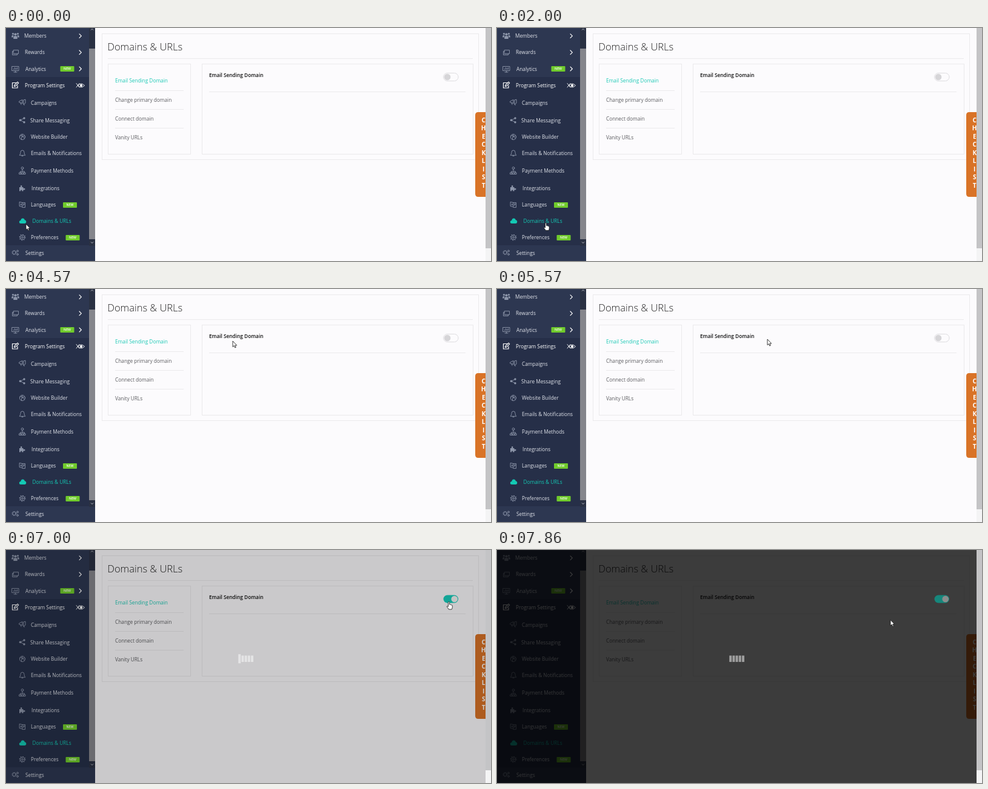
An HTML page for the animation above (8000 ms loop, 800 by 385 pixels).

```html
<!DOCTYPE html>
<html lang="en">
<head>
<meta charset="utf-8">
<title>Domains &amp; URLs</title>
<style>
html, body { margin: 0; width: 100%; height: 100%; overflow: hidden; background: #fcfbfd; }
svg { display: block; width: 800px; height: 385px; font: 8.27px "Open Sans", sans-serif; }
.box { fill: none; stroke: #ebeaec; }
.icon { fill: none; stroke: #8d96aa; stroke-width: .9; stroke-linejoin: round; stroke-linecap: round; }
.solid { fill: #8d96aa; stroke: none; }
.badge { font-size: 5.2px; font-weight: 600; fill: #fff; text-anchor: middle; }
.cursor { fill: #fff; stroke: #111; stroke-width: .8; stroke-linejoin: round; }
</style>
</head>
<body>
<svg viewBox="0 0 800 385">
  <rect width="800" height="385" fill="#fcfbfd"/>

  <g class="box">
    <rect x="158.5" y="9.5" width="621" height="208"/>
    <rect x="168.5" y="59.5" width="136" height="149"/>
    <rect x="323.5" y="59.5" width="447" height="149"/>
    <path d="M168 50.5H770M180 103.5H293M180 134.5H293M180 165.5H293M335 105.5H758"/>
  </g>
  <text x="167.3" y="36.5" font-size="16.5" font-weight="300" fill="#222">Domains &amp; URLs</text>
  <g fill="#5c5c60">
    <text x="180" y="90.3" fill="#1cc9b5">Email Sending Domain</text>
    <text x="180" y="121.5">Change primary domain</text>
    <text x="180" y="153">Connect domain</text>
    <text x="180" y="184.3">Vanity URLs</text>
  </g>
  <text x="335" y="81" font-weight="600" fill="#111">Email Sending Domain</text>

  <rect width="147" height="385" fill="#2d3751"/>
  <rect y="81" width="137" height="278" fill="#262f48"/>
  <rect x="137" width="10" height="360" fill="#2a3143"/>
  <rect x="137" y="34" width="10" height="315" fill="#85868c"/>
  <path d="M140 3.5l2-2 2 2M140 353.500l2 2 2-2" fill="none" stroke="#b9bcc4"/>

  <g id="menu" fill="#dfe2e9"></g>

  <g class="icon">
    <g class="solid">
      <circle cx="15.500" cy="10.500" r="2.100"/><circle cx="11.500" cy="9.500" r="1.600"/><circle cx="19.500" cy="9.500" r="1.600"/>
      <path d="M12.300 18v-3q0-2 3.200-2t3.200 2v3zM9.300 15.500v-2q0-2 3.200-1.700l-1 3.700zM21.700 15.500v-2q0-2-3.200-1.700l1 3.700z"/>
    </g>
    <path d="M12.500 36.500h8v6h-8zM12.500 38.500h-2v6h8v-2"/>
    <path d="M10 63.500h11v7H10zM13 73h5M15.500 71v2M12.500 68.500v-1M14.500 68.500v-3M16.500 68.500v-2M18.500 68.500v-3"/>
    <path d="M17 90.500h-6.500v8.500h8.500v-4M13.500 96.500l.6-2.300 5-5 1.700 1.700-5 5z" stroke="#fff" stroke-width="1.200"/>
    <path d="M22 121l5-2.500v6l-5-1.500zM24 123.500l1 3M29 119l3-1v6l-3 2zM30 126v1.500"/>
    <path d="M30 149l-6.500 3.300 6.500 3.400"/>
    <g class="solid"><circle cx="30" cy="149" r="1.700"/><circle cx="23.500" cy="152.300" r="1.800"/><circle cx="30" cy="155.700" r="1.700"/></g>
    <circle cx="27" cy="180" r="4.600"/><path d="M23 178q5-2 7.500 5M25.500 184q-1-6 5-6M27 175.500q-2 3 0 5"/>
    <path d="M22.500 210q1.500-1.500 1.500-4.500 0-3.500 3-3.500t3 3.500q0 3 1.500 4.500zM26 211.500h2"/>
    <path d="M27 233v4M23.500 239v-2h7v2M22 239h3v2.500h-3zM29 239h3v2.500h-3zM25.500 239h3v2.500h-3z"/><circle cx="27" cy="231.500" r="1.900"/>
    <path class="solid" d="M22 263h2.300q-1-3 .9-3t.9 3h2.400v2.200q3-1 3 1t-3 1v2.300h-2.300q.6-2-1-2t-1 2H22z"/>
    <path d="M22.500 287.500l4.500 1v7l-4.500-1zM27 288.500h4.500v8H27M24 292.500l.8-2 .8 2M28.500 291h2M29.500 290.500q0 2-1 3"/>
    <path d="M24.500 323q-2.700 0-2.700-2.500t2.500-2.500q.3-3.600 3.400-3.600 2.600 0 3 2.800 2.600.3 2.600 3t-2.700 2.800z" fill="#14c9b4" stroke="none"/>
    <circle cx="27" cy="346" r="3.700"/><circle cx="27" cy="346" r="1.500"/>
    <circle cx="27" cy="346" r="4.700" stroke-width="1.300" stroke-dasharray="1.300 2.390" stroke-linecap="butt"/>
    <circle cx="13.500" cy="371" r="2.700"/><circle cx="13.500" cy="371" r="3.600" stroke-dasharray="1.300 1.530" stroke-linecap="butt"/>
    <circle cx="19" cy="368.500" r="1.400"/><circle cx="19" cy="374" r="1.400"/>
    <g stroke="#fff">
      <path d="M121 9.800l3.300 3.300-3.300 3.300M121 37l3.300 3.300-3.300 3.300M121 64.200l3.300 3.300-3.300 3.300" stroke-width="1.200"/>
      <path d="M116 91.500l5 6.500M116 98l5-6.500M118.500 95q5.500-6 11 0-5.500 6-11 0z"/>
      <circle cx="124" cy="95" r="1.700" fill="#fff"/>
    </g>
  </g>
  <g id="badges"></g>

  <path d="M791 139h-12q-5 0-5 5v130q0 5 5 5h12z" fill="#d97327"/>
  <g id="checklist" fill="#fff" font-size="10" font-weight="700" text-anchor="middle"></g>

  <rect id="shade" width="791" height="385"/>
  <rect x="791" width="9" height="385" fill="#f4f4f5"/>
  <rect x="791" width="9" height="364" fill="#c4c4c6"/>

  <rect id="track" x="721.500" y="74.500" width="24.500" height="13" rx="6.500"/>
  <circle id="knob" cy="81" r="5.300"/>
  <g id="loader" fill="#fff" fill-opacity=".5"></g>

  <path id="arrow" class="cursor" d="M0 0V9.600L2.200 7.600 3.700 11 5.300 10.300 3.800 7.100H6.700Z"/>
  <path id="hand" class="cursor" d="M-1 6.800V1Q-1 0 0 0T1 1V4.600Q2 3.800 2.700 5 3.800 4.400 4.300 5.600 5.700 5.300 5.700 6.800V9Q5.700 11 4.600 12.600H-.2Q-1 10.800-3.300 8.200-3.500 6.300-1 8Z"/>
</svg>
<script>
const $ = id => document.getElementById(id);

const MENU = [
  ["Members", 30, 16.3], ["Rewards", 31, 43.3], ["Analytics", 32, 70.8],
  ["Program Settings", 31, 98, "#fff"], ["Campaigns", 41, 126.800], ["Share Messaging", 40, 155.600],
  ["Website Builder", 41, 183.2], ["Emails &amp; Notifications", 41, 210], ["Payment Methods", 41, 239],
  ["Integrations", 42, 267.800], ["Languages", 41, 295.2], ["Domains &amp; URLs", 43.500, 322.2, "#14c9b4"],
  ["Preferences", 41, 349.2], ["Settings", 32, 374.800]
];
$("menu").innerHTML = MENU.map(([label, x, y, color]) =>
  `<text x="${x}" y="${y}"${color ? ` fill="${color}"` : ""}>${label}</text>`).join("");

$("badges").innerHTML = [[89.5, 63], [94, 288], [98.5, 342]].map(([x, y]) =>
  `<rect x="${x}" y="${y}" width="23" height="9" rx="1" fill="#70cb2c"/>
   <text class="badge" x="${x + 11.5}" y="${y + 6.4}">NEW</text>`).join("");

$("checklist").innerHTML = [..."CHECKLIST"].map((letter, i) =>
  `<text x="787.700" y="${155.700 + i * 13.5}">${letter}</text>`).join("");

$("loader").innerHTML = "<rect width='4'/>".repeat(5);

// Time is counted in steps of 1/7 s; path entries are [step, x, y].
const STEPS_PER_MS = 7 / 1000, LOOP = 8000, SWITCH_ON = 49;
const PATH = [
  [1, 33, 324], [9, 97, 323], [14, 80.5, 322], [19, 80.5, 322], [22, 150, 240],
  [24, 238, 150], [26, 296, 104], [27, 320, 100], [32, 374, 86], [35, 368, 82],
  [36, 375, 82], [39, 446, 83], [41, 580, 79], [43, 716, 85], [44, 729.5, 86],
  [45, 729.5, 86], [47, 730.5, 85.5], [50, 730.5, 85.5], [55, 649, 115.5]
];
const FADE = [.2, .52, .74, .76];

function cursorAt(step) {
  const next = PATH.findIndex(p => p[0] >= step);
  if (next === 0) return PATH[0].slice(1);
  const [s0, x0, y0] = PATH[next - 1], [s1, x1, y1] = PATH[next];
  const u = (step - s0) / (s1 - s0);
  return [x0 + (x1 - x0) * u, y0 + (y1 - y0) * u];
}

function setAttrs(el, attrs) {
  for (const name in attrs) el.setAttribute(name, attrs[name]);
}

function draw(now) {
  const step = Math.min(55, Math.floor((now % LOOP + 5) * STEPS_PER_MS));
  const since = step - SWITCH_ON, on = since >= 0;
  const dim = on ? FADE[Math.min(since, 3)] : 0;

  const [x, y] = cursorAt(step);
  const overLink = x > 41 && x < 110 && y > 312 || x > 720;
  for (const id of ["arrow", "hand"])
    setAttrs($(id), { transform: `translate(${x} ${y})`, visibility: overLink === (id === "hand") ? "visible" : "hidden" });

  $("shade").setAttribute("opacity", dim);
  setAttrs($("track"), on
    ? { fill: dim < .5 ? "#12a597" : "#16877c", stroke: "none" }
    : { fill: "#fcfbfd", stroke: "#dedde0" });
  setAttrs($("knob"), { cx: on ? 739.700 : 728, fill: on ? (dim < .5 ? "#c4c4c4" : "#8c8c8c") : "#d6d5d8" });

  $("loader").setAttribute("visibility", on ? "visible" : "hidden");
  [...$("loader").children].forEach((bar, i) => {
    const height = since % 7 === i ? 15 : 10.5;
    setAttrs(bar, { x: 383.2 + i * 5.2, y: 179.700 - height / 2, height });
  });
  requestAnimationFrame(draw);
}
draw(0);
</script>
</body>
</html>
```
